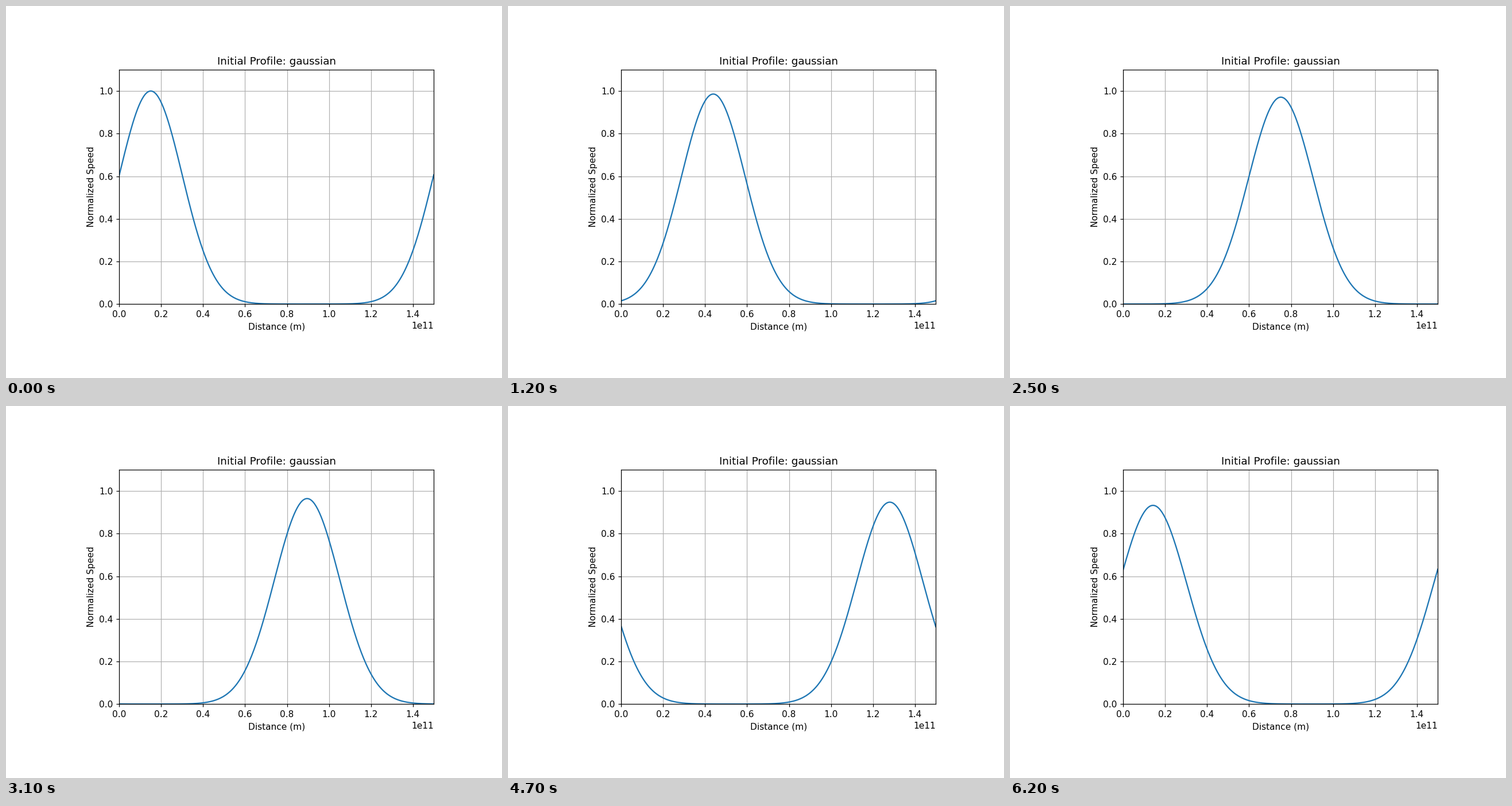
A matplotlib script that plays this animation: 864x648 px, repeating every 6250 ms.

```python
import numpy as np
import matplotlib.pyplot as plt
from matplotlib.animation import FuncAnimation

FRAMES, INTERVAL = 125, 50
LENGTH = 1.5e11      # domain size in metres
POINTS = 400
CFL = 0.4
SUBSTEPS = 8         # upwind steps per frame

plt.rcParams["font.family"] = "DejaVu Sans"

x = np.linspace(0, LENGTH, POINTS)


def initial_profile():
    """Gaussian bump, wrapped around the periodic domain."""
    d = (x - 0.1 * LENGTH + LENGTH / 2) % LENGTH - LENGTH / 2
    return np.exp(-0.5 * (d / (0.1 * LENGTH)) ** 2)


def advance(u):
    """First-order upwind advection with periodic ends."""
    for _ in range(SUBSTEPS):
        u = u.copy()
        u[1:] -= CFL * np.diff(u)
        u[0] = u[-1]
    return u


profiles = [initial_profile()]
while len(profiles) < FRAMES:
    profiles.append(advance(profiles[-1]))

# 864 x 648 pixels
fig = plt.figure(figsize=(7.8125, 5.859375), dpi=110.592, facecolor="white")
ax = fig.add_axes([197.4 / 864, 128.8 / 648, 547.7 / 864, 408.2 / 648])
ax.set_xlim(0, LENGTH)
ax.set_ylim(0, 1.1)
ax.set_title("Initial Profile: gaussian")
ax.set_xlabel("Distance (m)")
ax.set_ylabel("Normalized Speed")
ax.grid(True)
line, = ax.plot(x, profiles[0])


def update(i):
    line.set_ydata(profiles[i])
    return line,


anim = FuncAnimation(fig, update, frames=FRAMES, interval=INTERVAL,
                     repeat=True, repeat_delay=0)
plt.show()
```
